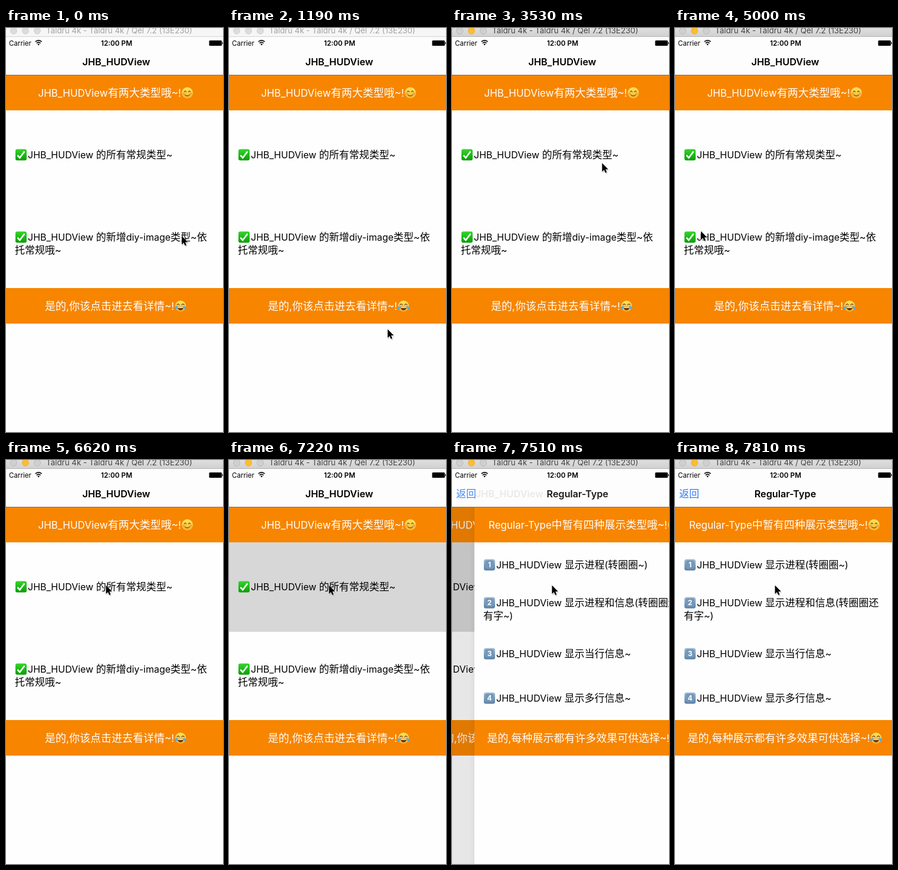
These frames come from a looping animation (368x682 px, 8 s). An HTML page:

```html
<!DOCTYPE html>
<html lang="zh">
<head>
<meta charset="utf-8">
<title>JHB_HUDView</title>
<style>
  html, body { margin: 0; width: 100%; height: 100%; overflow: hidden; background: #fefefe; }
  svg { display: block; width: 368px; height: 682px; }
  text { font-family: Inter, 'Noto Sans CJK SC', 'Noto Sans CJK', 'Noto Sans CJK JP', sans-serif; white-space: pre; }
  .han { font-family: 'Noto Sans CJK SC', 'Noto Sans CJK', 'Noto Sans CJK JP', sans-serif; }
</style>
</head>
<body>
<svg viewBox="0 0 368 682">
  <defs>
    <linearGradient id="face" x2="0" y2="1"><stop stop-color="#ffe65e"/><stop offset="1" stop-color="#f5b02c"/></linearGradient>
    <linearGradient id="key" x2="0" y2="1"><stop stop-color="#a3bdd4"/><stop offset="1" stop-color="#587fa6"/></linearGradient>
    <linearGradient id="green" x2="0" y2="1"><stop stop-color="#35d62c"/><stop offset="1" stop-color="#0a9e08"/></linearGradient>
    <linearGradient id="chrome" x2="0" y2="1"><stop stop-color="#dedede"/><stop offset="1" stop-color="#d1d1d1"/></linearGradient>
    <linearGradient id="edge"><stop stop-opacity="0"/><stop offset="1" stop-opacity=".04"/></linearGradient>
    <g id="smile">
      <circle r="9.5" fill="url(#face)"/>
      <g fill="#f0883c" opacity=".6"><circle cx="-6" cy="1.5" r="2"/><circle cx="6" cy="1.5" r="2"/></g>
      <path d="M-5-1.8q1.5-2.6 3 0M2-1.8q1.5-2.6 3 0M-4 3.4q4 3.4 8 0" fill="none" stroke="#6b3d10" stroke-width="1.1" stroke-linecap="round"/>
    </g>
    <g id="joy">
      <circle r="9.3" fill="url(#face)"/>
      <path d="M-6-2.2q2-3 4 0M2-2.2q2-3 4 0" fill="none" stroke="#6b3d10" stroke-width="1.2" stroke-linecap="round"/>
      <path d="M-5.4 1H5.4Q4.6 7 0 7T-5.4 1Z" fill="#6b3410"/>
      <path d="M-4.8 1.2H4.8L4.3 3H-4.3Z" fill="#fff"/>
      <path id="tear" d="M-5.2-.6Q-10.5.5-9.6 4.6-8 6.6-6.3 4.4-5.2 2.4-5.2-.6Z" fill="#4aaee8"/>
      <use href="#tear" transform="scale(-1 1)"/>
    </g>
    <g id="check">
      <rect x="-9.5" y="-9.5" width="19" height="19" rx="3" fill="url(#green)"/>
      <path d="M-6 .8-2.2 5.2 5.8-5.6" fill="none" stroke="#fff" stroke-width="2.6"/>
    </g>
    <g id="cap">
      <rect x="-9.5" y="-9.5" width="19" height="19" rx="3.5" fill="url(#key)"/>
      <rect x="-7" y="-7.5" width="14" height="14" rx="3" fill="#7397b8"/>
    </g>
  </defs>

  <g id="home"></g>
  <rect id="dim" y="79" width="368" height="603"/>
  <g id="detail"></g>

  <rect y="15" width="368" height="64" fill="#fdfdfd"/>
  <rect y="79" width="368" height="1" fill="#a8641a"/>
  <g id="nav"></g>

  <g id="status">
    <g fill="none" stroke="#000" stroke-width="1.7">
      <path d="M49.8 23.2q5.4-4.8 10.8 0M51.9 25.6q3.3-2.8 6.6 0"/>
    </g>
    <path d="M53.4 27.3q1.8-1.5 3.6 0L55.2 29.4Z"/>
    <rect x="344.5" y="21" width="21.5" height="9" rx="1.5"/>
    <path d="M366.8 23.8h1.2v3.4h-1.2Z"/>
  </g>

  <rect id="bar" width="368" height="14"/>
  <rect id="barLine" y="14" width="368" height="1"/>
  <g id="lights" stroke-width="1">
    <circle cx="13" cy="4.7" r="5.5"/><circle cx="33" cy="4.7" r="5.5"/><circle cx="53" cy="4.7" r="5.5"/>
  </g>
  <g id="caption"></g>

  <g id="cursor">
    <path d="M1 2V17L4.5 13.7 6.8 18.6 9.4 17.5 7.2 12.8H11.6Z" opacity=".2"/>
    <path d="M0 0V14.6L3.4 11.5 5.6 16.6 8 15.6 5.9 10.6H10.4Z" stroke="#fff" stroke-width="1.1" paint-order="stroke"/>
  </g>
</svg>
<script>
const $ = id => document.getElementById(id);
const add = (id, html) => $(id).insertAdjacentHTML('beforeend', html);

// Latin runs are set one pixel smaller than Han runs.
const runs = (str, size) => str.match(/[\u2e80-\u9fff]+|[^\u2e80-\u9fff]+/g).map(s =>
  /[\u2e80-\u9fff]/.test(s)
    ? `<tspan class="han" font-size="${size}">${s}</tspan>`
    : `<tspan font-size="${size - 1}">${s}</tspan>`).join('');
const text = (x, y, str, size = 17, attrs = '') => `<text x="${x}" y="${y}" ${attrs}>${runs(str, size)}</text>`;
const icon = (name, x, y) => `<use href="#${name}" x="${x}" y="${y}"/>`;
const band = (y, x, str, name, iconX) =>
  `<rect y="${y}" width="368" height="60" fill="#f78500"/>` +
  text(x, y + 36.5, str, 18, 'fill="#fff"') + icon(name, iconX, y + 30.5);
const page = '<rect y="79" width="368" height="603" fill="#fefefe"/>';
const bold = 'font-weight="600" text-anchor="middle"';

add('home', page +
  '<rect id="row" y="139" width="368" height="151" fill="#d7d7d7"/>' +
  band(79, 54.5, 'JHB_HUDView有两大类型哦~!', 'smile', 307.5) +
  icon('check', 25.5, 214) + text(37, 220, 'JHB_HUDView 的所有常规类型~') +
  icon('check', 25.5, 353) + text(37, 359, 'JHB_HUDView 的新增diy-image类型~依') +
  text(15, 381, '托常规哦~') +
  band(439, 66, '是的,你该点击进去看详情~!', 'joy', 296));

const items = [[177, '显示进程(转圈圈~)'], [241, '显示进程和信息(转圈圈还'], [327, '显示当行信息~'], [402, '显示多行信息~']];
add('detail', '<rect x="-9" y="79" width="9" height="603" fill="url(#edge)"/>' + page +
  band(79, 24, 'Regular-Type中暂有四种展示类型哦~!', 'smile', 337.5) +
  items.map(([y, label], i) => icon('cap', 25.5, y) +
    text(25.5, y + 4, `${i + 1}`, 13, 'fill="#fff" font-weight="700" text-anchor="middle"') +
    text(37, y + 6, 'JHB_HUDView ' + label)).join('') +
  text(15, 269, '有字~)') +
  band(439, 21.5, '是的,每种展示都有许多效果可供选择~!', 'joy', 341));

add('nav', text(187, 63, 'JHB_HUDView', 17.3, 'id="oldTitle" ' + bold) +
  text(187, 63, 'Regular-Type', 17.2, 'id="newTitle" ' + bold) +
  text(7, 63, '返回', 17, 'id="back" fill="#2f7bf6"'));
add('status', text(5, 29.7, 'Carrier', 12.6) + text(187.5, 29.7, '12:00 PM', 12.8, bold));
add('caption', text(68, 9.3, 'Taldru 4k - Taldru 4k / Qel 7.2 (13E230)', 14.4));

// Pointer path: time, x, y
const path = [
  [310, 298, 351], [740, 290, 430], [1330, 262, 535], [1480, 262, 535],
  [1780, 250, 250], [2070, 232, 10], [2210, 224.5, 82], [2650, 160, 156],
  [2950, 114, 215], [3540, 255, 228], [3830, 231, 232], [4120, 286, 213],
  [4420, 286, 213], [5000, 43.5, 341.5], [5300, 62, 385], [5590, 69, 354],
  [6180, 194, 250], [6620, 169.5, 211.5], [8000, 169.5, 211.5]
];
function pointer(t) {
  const i = path.findIndex(p => p[0] >= t);
  if (i < 1) return path[0].slice(1);
  const [a, b] = [path[i - 1], path[i]], k = (t - a[0]) / (b[0] - a[0]);
  return [a[1] + (b[1] - a[1]) * k, a[2] + (b[2] - a[2]) * k];
}

const STEP = 147.2, LOOP = 8000;
const move = (id, x, y = 0) => $(id).setAttribute('transform', `translate(${x} ${y})`);
const set = (id, name, value) => $(id).setAttribute(name, value);

function draw(time) {
  const tick = Math.floor((time - 437) / STEP);
  const t = tick < 0 ? 0 : 446 + tick * STEP;

  const [x, y] = pointer(t);
  move('cursor', Math.round(x * 2) / 2, Math.round(y * 2) / 2);

  const active = t > 2040;
  set('bar', 'fill', active ? 'url(#chrome)' : '#f6f6f6');
  set('barLine', 'fill', active ? '#b4b4b4' : '#d4d4d4');
  set('caption', 'fill', active ? '#444' : '#a2a2a2');
  [...$('lights').children].forEach((dot, i) => {
    const lit = active && i === 1;
    dot.setAttribute('fill', lit ? '#fdbd2f' : active ? '#d0d0d0' : '#dcdcdc');
    dot.setAttribute('stroke', lit ? '#f0b02a' : active ? '#b9b9b9' : '#d0d0d0');
  });

  // Critically damped push to the second page.
  const z = Math.max(0, (t - 7301) * 0.01826);
  const left = (1 + z) * Math.exp(-z), done = 1 - left;
  const offset = Math.round(368 * left);
  set('row', 'opacity', t > 7190 ? 1 : 0);
  move('home', -110 * done);
  set('dim', 'opacity', 0.1 * done);
  move('detail', offset + (z ? 0 : 20));
  move('oldTitle', -100 * done);
  set('oldTitle', 'opacity', z ? Math.max(0, left - 0.03) : 1);
  move('newTitle', offset * 0.68);
  set('newTitle', 'opacity', done);
  set('back', 'opacity', done);
}

function frame() {
  draw(performance.now() % LOOP);
  requestAnimationFrame(frame);
}
frame();
</script>
</body>
</html>
```
